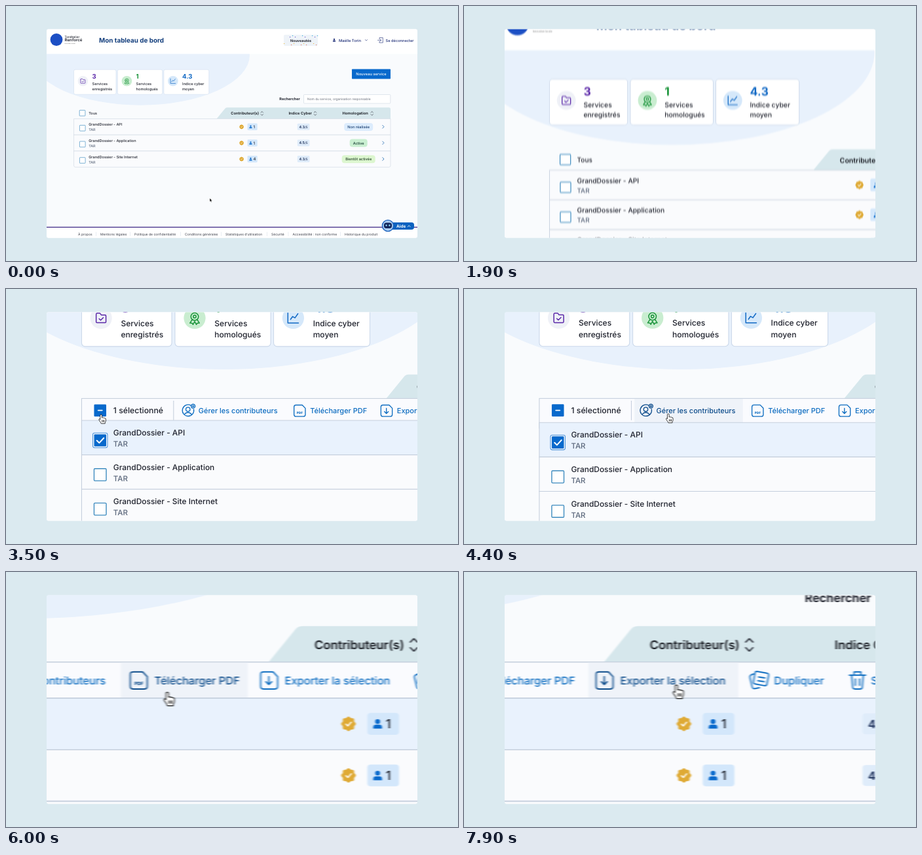
Recreate the animation shown at these times as an HTML page. Size 690 px wide and 390 px high, loop 8 s.

```html
<!DOCTYPE html>
<html lang="fr">
<head>
<meta charset="utf-8">
<style>
html, body { margin: 0; width: 100%; height: 100%; overflow: hidden; background: #dbeaf0; }
svg { display: block; }
text { font-family: Inter, "Open Sans", sans-serif; text-rendering: geometricPrecision; white-space: pre; }
</style>
</head>
<body>
<svg id="stage" width="690" height="390" viewBox="0 0 690 390"></svg>
<script>
const BLUE = '#0869cc', LINK = '#0c6cc0', DARK = '#0d4c8b', INK = '#20232e', LINE = '#c5cfdd';
const TOP = 172.5, ROW = 24.65, BAR = 17.25;

// Drawing helpers
const text = (x, y, size, str, fill = INK, weight = 500, anchor = 'start') =>
  `<text x="${x}" y="${y}" font-size="${size}" fill="${fill}" font-weight="${weight}" text-anchor="${anchor}">${str}</text>`;
const rect = (x, y, w, h, fill, r = 0, stroke = 'none', sw = .5) =>
  `<rect x="${x}" y="${y}" width="${w}" height="${h}" rx="${r}" fill="${fill}" stroke="${stroke}" stroke-width="${sw}"/>`;
const dot = (x, y, r, fill, stroke = 'none', sw = .5) =>
  `<circle cx="${x}" cy="${y}" r="${r}" fill="${fill}" stroke="${stroke}" stroke-width="${sw}"/>`;
const line = (d, stroke, sw = .6, fill = 'none') =>
  `<path d="${d}" fill="${fill}" stroke="${stroke}" stroke-width="${sw}" stroke-linecap="round" stroke-linejoin="round"/>`;
const group = (x, y, body, attrs = '') => `<g transform="translate(${x} ${y})" ${attrs}>${body}</g>`;
const person = (x, y, fill) => group(x, y, dot(0, -1.2, 1.15, fill) +
  `<path d="M-2.1 2.2V1.7Q-2.1.3-.8.3H.8Q2.1.3 2.1 1.7v.5z" fill="${fill}"/>`);
const box = (x, y) => rect(x, y, 8.7, 8.7, '#fff', .6, '#3d8bbf', .65);
const sorter = x => line(`M${x - 1.7} 163l1.7-1.7 1.7 1.7m0 2.6l-1.7 1.7-1.7-1.7`, INK, .6);

function header() {
  const colors = ['#f0b52e', '#4a3ac8', '#e5694f', '#25a3d8'];
  let confetti = '';
  for (let i = 0; i < 16; i++) {
    const x = 424 + (i * 17) % 53, y = i % 2 ? 44 + (i * 3) % 4 : 57 + (i * 5) % 4;
    confetti += rect(x, y, 1.2, 1, colors[i % 4], .3);
  }
  return rect(62, 35, 566, 38.3, '#fff') +
    dot(77, 51.5, 9.4, '#1c4fc4') +
    text(89.5, 48.5, 4.7, 'TonAtelier') + text(89.5, 54.2, 6.2, 'Renforcé', INK, 600) +
    text(89.5, 58.3, 2, 'Innovation locale', '#777') +
    text(142, 56.3, 9.9, 'Mon tableau de bord', '#143f7d', 700) +
    rect(424, 44, 52, 17, '#eef3f8', 2) + confetti +
    text(450, 54.5, 5.4, 'Nouveautés', INK, 700, 'middle') +
    person(501, 52.2, '#1b2b75') + text(508, 54.6, 5.8, 'Maëlle Torin', '#1b2b75') +
    line('M548.4 51.5l1.6 1.6 1.6-1.6', '#1b2b75') +
    line('M570 50.3v-1.8h5.3v7.6H570v-1.8M567.5 52.3h5m-1.6-1.7l1.7 1.7-1.7 1.7', '#1b2b75') +
    text(579.5, 54.6, 5.7, 'Se déconnecter', '#1b2b75');
}

function card(x, w, iconX, tint, color, icon, count, l1, l2) {
  const tx = iconX + 14.2;
  return rect(x, 97.2, w, 38, '#fff', 2.5, '#cbd8ea') + dot(iconX, 114.8, 7.8, tint) +
    group(iconX, 114.8, line(icon, color, .7)) +
    text(tx, 111, 9.6, count, color, 700) + text(tx, 120.5, 5.65, l1) + text(tx, 128.6, 5.65, l2);
}

function summary() {
  return card(103.5, 64.5, 117.4, '#eff1f7', '#5a27a8',
      'M-3.5-2.5v5.3q0 .6.6.6h5.8q.6 0 .6-.6v-4.4q0-.6-.6-.6h-2.7l-1-1.2h-2.1q-.6 0-.6.9M-1.4.5l1.1 1.1 1.9-1.9',
      '3', 'Services', 'enregistrés') +
    card(170.3, 68.5, 184.4, '#c9edd0', '#179237',
      'M-2.7-1a2.7 2.7 0 1 1 5.4 0a2.7 2.7 0 1 1-5.4 0M-1-1a1 1 0 1 1 2 0a1 1 0 1 1-2 0M-1.8 1.2l-1.6 2.4 1.5.1.7 1 1.2-2.2 1.2 2.2.7-1 1.5-.1-1.6-2.4',
      '1', 'Services', 'homologués') +
    card(240.9, 68.9, 254.9, '#d5e8fa', '#1068c4',
      'M-3.8-3.6v7.2h7.6M-1.9 1l1.5-2.1 1.7 1 2.1-3',
      '4.3', 'Indice cyber', 'moyen') +
    rect(528, 96.5, 59, 15, BLUE, .8) + text(557.5, 106, 5.75, 'Nouveau service', '#fff', 500, 'middle') +
    text(417.3, 143.9, 5.6, 'Rechercher', INK, 700) +
    rect(454.5, 135.5, 132.3, 13.5, '#fff', 1, '#c3cedb') +
    text(460, 143.9, 4.85, 'Nom du service, organisation responsable', '#666c78', 400);
}

function head() {
  return `<path d="M321.5 172.5L334 157.2q1.3-1.9 3.5-1.9H584.5q2.5 0 2.5 2.5v14.7z" fill="#d6e7ec"/>` +
    text(343.3, 166.3, 5.75, 'Contributeur(s)', '#15181f', 600) + sorter(390.8) +
    text(431.5, 166.3, 5.75, 'Indice Cyber', '#15181f', 600) + sorter(472) +
    text(513.5, 166.3, 5.8, 'Homologation', '#15181f', 600) + sorter(558.7) +
    `<g id="all">${box(112.2, 159.4)}${text(126.2, 166, 5.5, 'Tous')}</g>`;
}

// Toolbar actions: hover range, label position, label, icon
const page = x => `M${x + 1.5} 177.2h4.6l2.2 2.3v4.5q0 1.4-1.4 1.4h-5.3q-1.4 0-1.4-1.4v-5.4q0-1.4 1.3-1.4`;
const actions = [
  [171.5, 249, 187.1, 'Gérer les contributeurs',
    'M181.7 177.5a4.1 4.1 0 1 0 2 2.7M178.1 180.3a1.5 1.5 0 1 1 3 0a1.5 1.5 0 1 1-3 0M176.9 184q2.7-3 5.4 0M181.9 178a1.4 1.4 0 1 1 2.8 0a1.4 1.4 0 1 1-2.8 0M182.7 178h1.2m-.6-.6v1.2'],
  [251, 311.6, 267, 'Télécharger PDF', page(255.3)],
  [314, 385.6, 329.2, 'Exporter la sélection', page(317.5) + 'M321.6 179.5v3.7m-1.4-1.3l1.4 1.4 1.4-1.4'],
  [387.5, 435, 402.6, 'Dupliquer',
    'M394.4 177l4.8.8q1 .2.8 1.2l-.8 4q-.2 1-1.2.8l-4.4-.8q-1-.2-.8-1.2l.7-4q.2-.9.9-.8M392.8 178.2q-2 .5-1.7 1.8l1 4.2q.3 1.3 1.5 1l2-.4M395.2 179.6l3 .5m-3.3 1.3l3 .5'],
  [436.5, 479, 448.8, 'Supprimer',
    'M438.5 178.8h7.8m-6.7 0l.5 5.6q.1 1 1 1h2.6q.9 0 1-1l.5-5.6m-4.4 0v-1.6h3.2v1.6m-2.6 1.8v3m2 0v-3'],
];

function toolbar() {
  return `<g id="bar">` + rect(103.5, TOP, 483.5, BAR + 4, '#fafbfe', 0, LINE) +
    rect(112.4, 176.7, 8.7, 8.7, BLUE, .6) + line('M115.3 181h2.9', '#fff', .8) +
    text(126.2, 183.2, 5.75, '1 sélectionné') + line('M169.3 174.3v13.6', LINE, .5) +
    actions.map(([a, b, x, label, icon], i) => `<g class="action">` + rect(a, TOP + .3, b - a, BAR - .4, 'transparent') +
      line(icon, 'currentColor', .62) +
      (i == 1 ? text(259.6, 183.5, 2.2, 'PDF', 'currentColor', 800, 'middle') : '') +
      text(x, 183.2, 5.15, label, 'currentColor') + `</g>`).join('') + `</g>`;
}

function row(i, name, people, score, status, tint, color, half) {
  const y = TOP + i * ROW, last = i == 2;
  const shape = last ? `M103.5 ${y}v${ROW - 2.5}q0 2.5 2.5 2.5H584.5q2.5 0 2.5-2.5V${y}z` : `M103.5 ${y}v${ROW}H587v-${ROW}z`;
  return `<path class="row" d="${shape}" fill="#fafbfd" stroke="${LINE}" stroke-width=".5"/>` + group(0, y,
    box(112.4, 9.9) + text(126.2, 10.8, 5.6, name) + text(126.2, 18.8, 5.4, 'TAR', '#5c687c') +
    group(359.6, 12.3, rect(-2.7, -2.7, 5.4, 5.4, '#dfaa35', .9) +
      `<g transform="rotate(45)">${rect(-2.7, -2.7, 5.4, 5.4, '#dfaa35', .9)}</g>` + line('M-1.2.1l.9.9 1.6-1.8', '#fff', .6)) +
    rect(368.6, 7.1, 15.1, 10.4, '#d3e7fb', 1.4) + person(373.5, 12.4, BLUE) + text(377.4, 14.5, 6, people) +
    rect(444.8, 7.3, 18.6, 10, '#dfecfa', 1.4) +
    `<text x="454" y="14.3" font-size="5.5" text-anchor="middle" fill="#172b55" font-weight="600">${score}<tspan font-size="4.7" font-weight="500">/5</tspan></text>` +
    rect(538.2 - half, 6.4, half * 2, 12, tint, 4) + text(538.2, 14.4, 5.65, status, color, 500, 'middle') +
    line('M574.8 9.9l2.2 2.3-2.2 2.3', '#0b5ca8', .75));
}

function rows() {
  return `<g id="rows">` +
    row(0, 'GrandDossier - API', 1, '4.3', 'Non réalisée', '#dcecfd', '#173d70', 22) +
    row(1, 'GrandDossier - Application', 1, '4.5', 'Active', '#c9efd1', '#173d33', 13.5) +
    row(2, 'GrandDossier - Site Internet', 4, '4.3', 'Bientôt activée', '#dcf6cf', '#24402a', 25.5) +
    `<g id="tick">` + rect(111.5, TOP + 9, 10.5, 10.5, '#fff', 1.2, '#4a90d8', .5) +
    rect(112.4, TOP + 9.9, 8.7, 8.7, BLUE, .6) + line('M114.4 186.9l1.7 1.7 3.2-3.5', '#fff', .95) + `</g></g>`;
}

function footer() {
  const links = [[110, 'À propos'], [144, 'Mentions légales'], [196, 'Politique de confidentialité'],
    [273, 'Conditions générales'], [335, 'Statistiques d’utilisation'], [405, 'Sécurité'],
    [437.5, 'Accessibilité : non conforme'], [517, 'Historique du produit']];
  return rect(62, 338, 566, 17, '#fff') + rect(62, 337.7, 566, 1.3, '#45308a') +
    links.map(([x, s], i) => text(x, 350.8, 5.05, s, '#3a3d48', 400) +
      (i ? line(`M${x - 6.5} 346v5.5`, LINE, .4) : '')).join('') +
    rect(584, 331, 39, 11, '#0b62c0', 4) + text(596, 338.8, 6.4, 'Aide', '#fff', 700) +
    line('M613.4 337.5l1.8-1.8 1.8 1.8', '#fff', .9) +
    dot(583, 336, 9.3, '#1d63bd') + dot(583, 336, 7.9, '#a9cdf2') + rect(577, 331.5, 12, 8.5, '#13265c', 3.5) +
    dot(580.6, 335.5, 1.2, '#8fe0ff') + dot(585.4, 335.5, 1.2, '#8fe0ff');
}

const stage = document.getElementById('stage');
stage.innerHTML = `<defs><clipPath id="frame">${rect(62, 35.5, 566, 319, '#000', 3)}</clipPath>
  <filter id="blur" filterUnits="userSpaceOnUse" x="40" y="15" width="610" height="360" color-interpolation-filters="sRGB">
  <feGaussianBlur id="gauss" stdDeviation="0"/></filter></defs>
  <g clip-path="url(#frame)">${rect(62, 35, 566, 320, '#f9fbfd')}<g id="lens"><g id="world">` +
  rect(62, 35, 566, 320, '#f9fbfd') + `<ellipse cx="205" cy="75" rx="167" ry="76.7" fill="#e8f1fc"/>` +
  header() + summary() + head() + toolbar() + rows() + footer() +
  `<g id="cursor"><path id="arrow" d="M0 0V5.2l1.2-1 .9 1.9.9-.4-.9-1.9h1.7z" fill="#111" stroke="#fff" stroke-width=".35"/>
  <path id="hand" transform="scale(.9)" d="M-.7.7a.7.7 0 0 1 1.4 0V2.6q.6-.4 1.1.1q.6-.3 1 .2q1-.1 1 .9v1q0 .8-.6 1.6v.8h-3.1q-.4-1-1.6-2.6q-.5-.8.1-1.1q.5-.1.7.5zM.8 4.4v1.6M1.7 4.4v1.6M2.5 4.4v1.6" fill="#fff" stroke="#111" stroke-width=".42" stroke-linejoin="round"/></g>` +
  `</g></g></g>`;

// Motion: [time, ...values]
const camera = [[0, 1, 0, 0], [500, 1, 0, 0], [900, 1.76, -47, -27], [1800, 1.76, -47, -27],
  [2300, 2.133, -105.3, -200.5], [4400, 2.133, -105.3, -200.5], [4800, 3.2, -416, -414.3],
  [5600, 3.2, -416, -414.3], [6100, 3.2, -644, -414.3], [7400, 3.2, -644, -414.3], [8000, 3.2, -824, -414.3]];
const pointer = [[0, 311, 294], [2400, 311, 294], [2500, 212, 256], [2900, 117.4, 184], [4050, 117.4, 184],
  [4400, 195.6, 183.5], [4800, 218, 186], [5500, 218, 186], [5600, 222.5, 186.3], [6100, 277, 187],
  [7100, 277, 187], [7200, 281, 187.6], [7600, 356, 183.5], [8000, 356, 183.5]];
const ease = u => u + u * u - u * u * u;
const clamp = u => Math.max(0, Math.min(1, u));
function at(keys, t) {
  let i = 1;
  while (i < keys.length - 1 && keys[i][0] <= t) i++;
  const a = keys[i - 1], b = keys[i], p = ease(clamp((t - a[0]) / (b[0] - a[0])));
  return a.slice(1).map((v, k) => v + (b[k + 1] - v) * p);
}

const $ = id => document.getElementById(id);
const show = (id, on) => $(id).setAttribute('visibility', on ? 'visible' : 'hidden');
const buttons = [...document.querySelectorAll('.action')], firstRow = document.querySelector('.row');

function draw() {
  const t = performance.now() % 8000;
  const [s, x, y] = at(camera, t), [px, py] = at(pointer, t);
  const [s0, x0, y0] = at(camera, Math.max(0, t - 10));
  const vx = Math.abs((s - s0) * (px + 100) / 2 + x - x0), vy = Math.abs((s - s0) * 150 + y - y0);
  const selected = t >= 3150, open = ease(clamp((t - 3150) / 450));

  $('world').setAttribute('transform', `translate(${x} ${y}) scale(${s})`);
  $('gauss').setAttribute('stdDeviation', `${Math.min(1.6, vx)} ${Math.min(1.2, vy)}`);
  if (vx + vy > .1) $('lens').setAttribute('filter', 'url(#blur)');
  else $('lens').removeAttribute('filter');

  show('all', !selected);
  show('bar', selected);
  show('tick', selected);
  $('rows').setAttribute('transform', `translate(0 ${BAR * open})`);
  firstRow.setAttribute('fill', selected ? '#e9f2fd' : '#fafbfd');
  buttons.forEach((b, i) => {
    const over = selected && px > actions[i][0] && px < actions[i][1];
    b.style.color = over ? DARK : LINK;
    b.firstChild.setAttribute('fill', over ? '#eff3f9' : 'transparent');
  });
  $('cursor').setAttribute('transform', `translate(${px} ${py})`);
  show('arrow', t < 2850);
  show('hand', t >= 2850);
  requestAnimationFrame(draw);
}
draw();
</script>
</body>
</html>
```
